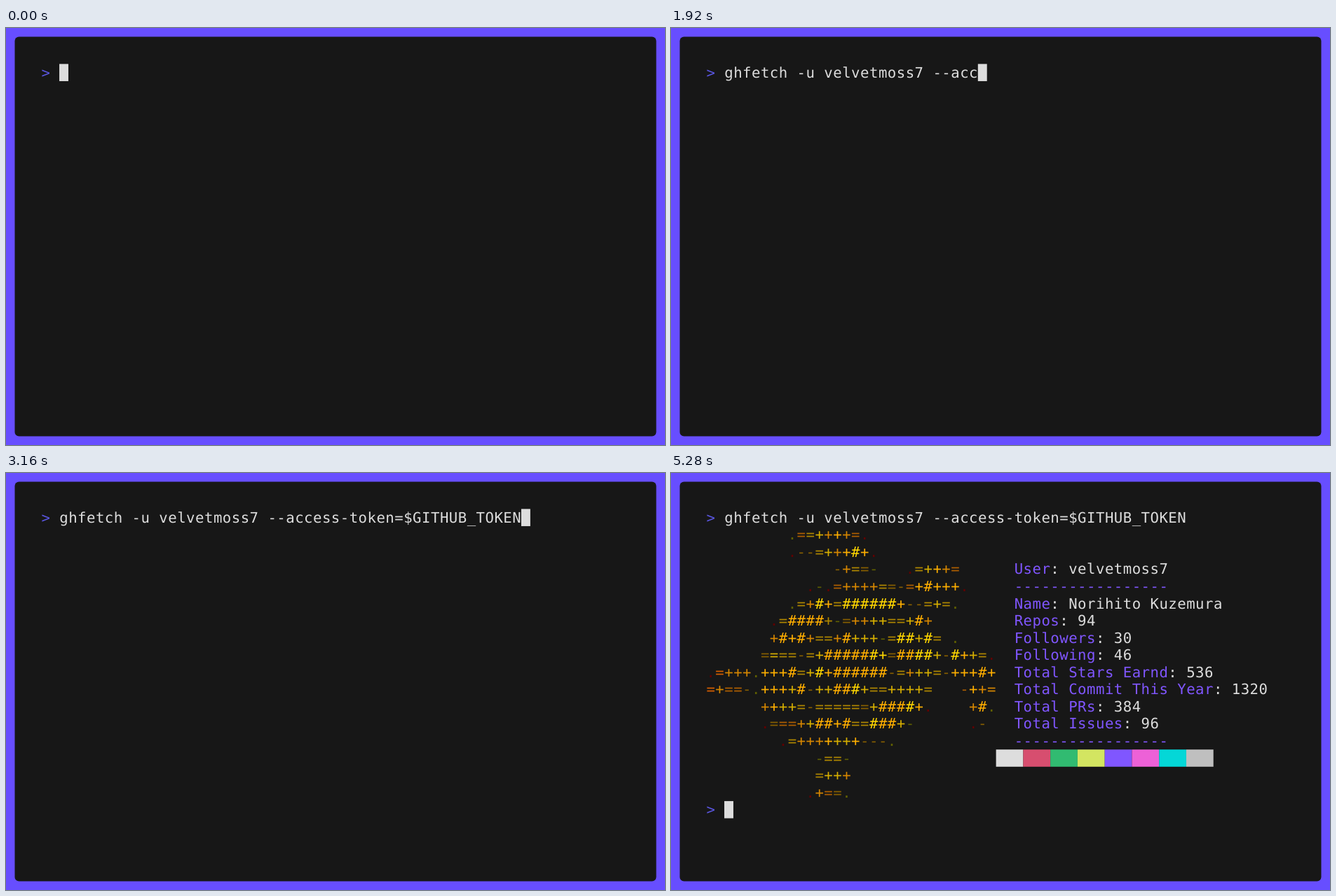
Write an HTML page with a canvas that moves like this. It is 940 px wide and 596 px high and loops after 8 s.

```html
<!DOCTYPE html>
<html lang="en">
<head>
<meta charset="utf-8">
<title>Terminal</title>
<style>
html, body { margin: 0; width: 100%; height: 100%; overflow: hidden; background: #674eff; }
canvas { display: block; }
</style>
</head>
<body>
<canvas id="stage" width="940" height="596"></canvas>
<script>
const ctx = document.getElementById('stage').getContext('2d');
const LOOP = 8000, TICK = 40;
const X0 = 50.2, Y0 = 51.4, CW = 12.92, RH = 24.56, SIZE = 20.7;
const FG = '#dddddd', VIOLET = '#8056ff', PROMPT = '#5a56e0';

const command = 'ghfetch -u velvetmoss7 --access-token=$GITHUB_TOKEN';
// [time, characters typed]
const typing = [[480, 1], [920, 9], [1240, 15], [1440, 19], [2120, 32], [2160, 33],
  [2440, 38], [2960, 47], [3000, 48], [3160, 51]];

const shades = { r: '#5f0000', o: '#5f5f00', b: '#875f00', c: '#af5f00', d: '#af8700',
  i: '#d75f00', e: '#d78700', h: '#d7af00', f: '#ffaf00', g: '#ffd700' };

// [first column, characters, shade of each]
const art = [
  [9, '.==++++=.', 'ocdhefecr'],
  [9, '.--=+++#+.', 'rbbdhefgfr'],
  [14, '-+==-   .=+++=', 'bedbo   rdhfec'],
  [11, '.-.=++++==-=+#+++.', 'rorceeeedbbcfffffr'],
  [9, '.=+#+=######+--=+=.', 'odegfdggggggfbbdhdo'],
  [7, '.=####+-=++++==+#+', 'rdffffdobeehhddhfe'],
  [7, '+#+#+==+#+++-=##+#= .', 'efffeddefhhhodgghgd o'],
  [6, '====-=+######+=####+-#++=.', 'bhddbdhfffffggbffgghbgfhdr'],
  [0, '.=+++.+++#=+#+######-=+++=-+++#+', 'rieeeoffffdhgfffffffbdehhdbfffff'],
  [0, '=+==-.++++#-++###+==++++=   -++=', 'ieccbofffhfbhhffghddhhhhd   cfee'],
  [6, '++++=-======+####+.    +#.', 'efhhdbdddddbhfffgfr    efo'],
  [6, '.===++##+#==###+-      .-', 'rbccehffffddgffho      rb'],
  [8, '.=+++++++---.', 'rdeeefhhfbbbo'],
  [12, '-==-', 'oddo'],
  [12, '=+++', 'dhhe'],
  [11, '.+==.', 'recbo']
];
const rule = '-'.repeat(17);
const info = [['User', 'velvetmoss7'], [rule], ['Name', 'Norihito Kuzemura'], ['Repos', 94],
  ['Followers', 30], ['Following', 46], ['Total Stars Earnd', 536],
  ['Total Commit This Year', 1320], ['Total PRs', 384], ['Total Issues', 96], [rule]];
const swatches = [FG, '#d74e6f', '#31bb71', '#d3e561', VIOLET, '#ed61d7', '#04d7d7', '#bfbfbf'];

function block(col, row, color, w = 1, h = 1) {
  ctx.fillStyle = color;
  ctx.fillRect(X0 + col * CW, Y0 + row * RH, w * CW, h * RH);
}

function text(col, row, str, color) {
  [...str].forEach((ch, i) => {
    ctx.fillStyle = typeof color === 'function' ? color(i) : color;
    if (ch !== ' ') ctx.fillText(ch, X0 + (col + i) * CW + 0.2, Y0 + row * RH + 19.3);
  });
}

function typedAt(t) {
  if (t < typing[0][0]) return 0;
  for (let i = 1; i < typing.length; i++) {
    const [ta, a] = typing[i - 1], [tb, b] = typing[i];
    if (t < tb) return Math.floor(a + (b - a) * (t - ta) / (tb - ta) + 1e-6);
  }
  return command.length;
}

function spinner(t) {
  const step = Math.floor((t - 4160) / 47) % 4;
  // lower left, upper left, upper right, lower right
  const right = step > 1, lower = step % 3 === 0;
  block(right ? 0.5 : 0, lower ? 1.5 : 1, VIOLET, 0.5, 0.5);
  block(1, 1, FG);
}

function output() {
  art.forEach(([col, chars, keys], i) => text(col, i + 1, chars, k => shades[keys[k]]));
  info.forEach(([label, value], i) => {
    text(34, i + 3, label, VIOLET);
    if (value !== undefined) text(34 + label.length, i + 3, ': ' + value, FG);
  });
  swatches.forEach((color, i) => block(32 + i * 3, 14, color, 3));
}

function draw(t) {
  ctx.fillStyle = '#674eff';
  ctx.fillRect(0, 0, 940, 596);
  ctx.fillStyle = '#171717';
  ctx.beginPath();
  ctx.roundRect(12.5, 12.5, 915, 571, 6);
  ctx.fill();

  ctx.font = SIZE + 'px "DejaVu Sans Mono", monospace';
  ctx.textRendering = 'geometricPrecision';
  const typed = typedAt(t);
  text(0, 0, '>', PROMPT);
  text(2, 0, command.slice(0, typed), FG);

  if (t < 3760) block(2 + typed, 0, FG);
  else if (t >= 5240) {
    output();
    const ready = t >= 5280;
    if (ready) text(0, 17, '>', PROMPT);
    block(ready ? 2 : 0, 17, FG);
  } else if (t >= 4160) spinner(t);
}

const start = performance.now();
function frame() {
  const t = (performance.now() - start) % LOOP;
  draw(Math.floor(t / TICK) * TICK);
  requestAnimationFrame(frame);
}
frame();
</script>
</body>
</html>
```
